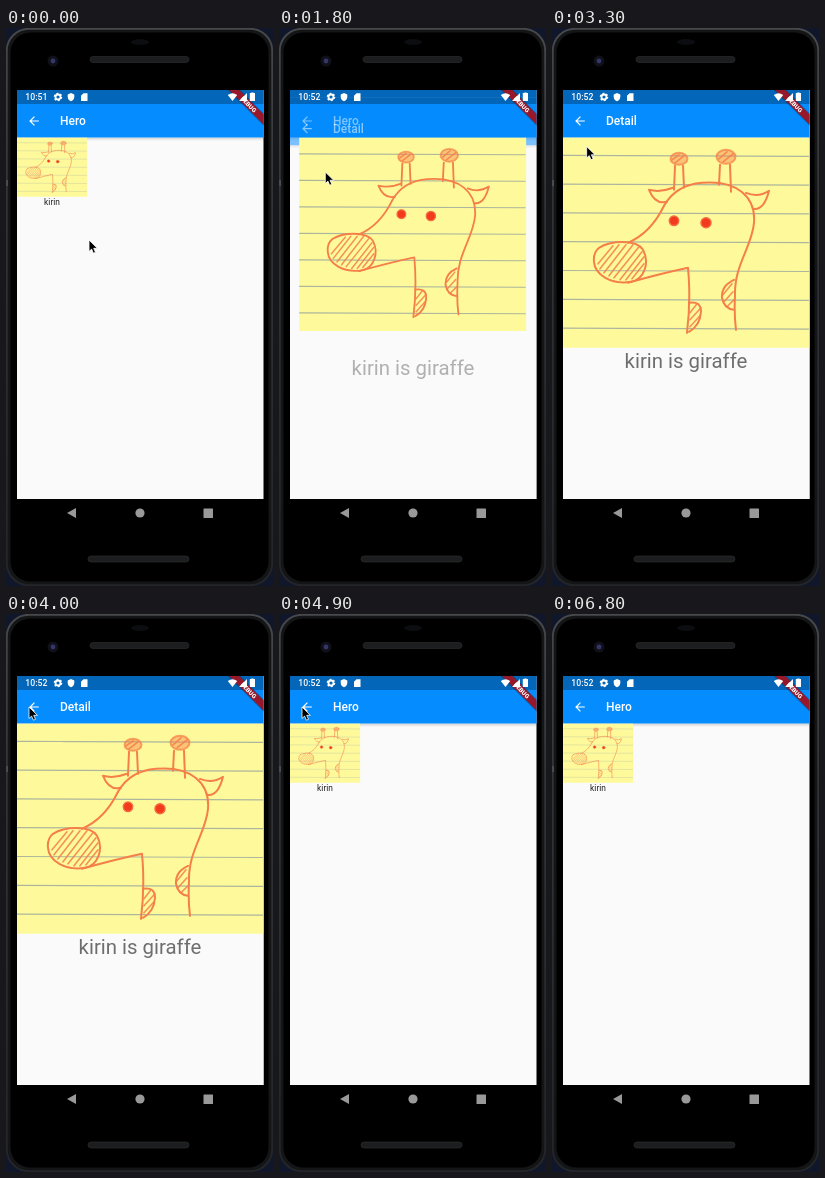
Animation, 267 px wide and 558 px high, one loop 6.9 s. Source, as an HTML page:

```html
<!DOCTYPE html>
<html lang="en">
<head>
<meta charset="utf-8">
<title>Hero transition</title>
<style>
  html, body { margin: 0; width: 100%; height: 100%; overflow: hidden; background: #10172a; }
  svg { display: block; width: 267px; height: 558px; font-family: Roboto, sans-serif; }
  .title { font-size: 12px; font-weight: 500; fill: #fff; }
  .ink { fill: none; stroke: #f57f48; stroke-width: 2; stroke-linecap: round; stroke-linejoin: round; }
  .hatch { stroke-width: 1.6; stroke-opacity: .85; }
</style>
</head>
<body>
<svg viewBox="0 0 267 558">
  <defs>
    <clipPath id="screen"><path d="M11 62H257.5V471H11z"/></clipPath>
    <linearGradient id="shade" x2="0" y2="1">
      <stop stop-opacity=".16"/><stop offset="1" stop-opacity="0"/>
    </linearGradient>
    <linearGradient id="rim" x2="0" y2="1">
      <stop stop-color="#48494b"/><stop offset=".3" stop-color="#333436"/><stop offset="1" stop-color="#242528"/>
    </linearGradient>
    <g id="page">
      <path d="M11 62H258V471H11z" fill="#fafafa"/>
      <path d="M11 109.5H258v3.5H11z" fill="url(#shade)"/>
      <path d="M11 62H258V109.5H11z" fill="#058dff"/>
      <path transform="translate(20.8 85.8) scale(.6)" fill="#fff"
        d="M20 11H7.83l5.59-5.59L12 4l-8 8 8 8 1.41-1.41L7.83 13H20z"/>
    </g>
  </defs>

  <!-- phone body -->
  <rect x=".8" y=".8" width="265.4" height="556.4" rx="22" fill="#141517" stroke="url(#rim)" stroke-width="1.8"/>
  <rect x="4.5" y="4.5" width="258" height="549" rx="20"/>
  <path d="M0 152h2v6H0z" fill="#4a4b4e"/>
  <ellipse cx="134" cy="14" rx="9" ry="3" fill="#0c0d10"/>
  <circle cx="47" cy="33" r="5.5" fill="#101118"/>
  <circle cx="47" cy="33" r="2.4" fill="#34366a"/>
  <g fill="#1c1d1f" stroke="#2a2b2d" stroke-width=".7">
    <rect x="84" y="28.5" width="99" height="6" rx="3"/>
    <rect x="82" y="528" width="101" height="6" rx="3"/>
  </g>
  <g fill="#999">
    <path d="M61 485l9-5v10z"/><circle cx="134" cy="485" r="4.6"/>
    <rect x="197.5" y="480.5" width="9.5" height="9.5" rx=".6"/>
  </g>

  <g clip-path="url(#screen)">
    <use href="#page"/>
    <text class="title" x="54" y="97.2">Hero</text>
    <text x="46" y="177" font-size="8.4" text-anchor="middle" fill="#222">kirin</text>

    <g id="detail">
      <use href="#page"/>
      <text class="title" x="54" y="97.2">Detail</text>
      <text x="134" y="339.5" font-size="20.4" text-anchor="middle" fill="#000" fill-opacity=".56">kirin is giraffe</text>
    </g>

    <!-- giraffe on lined paper, 246 x 210 -->
    <g id="picture">
      <path d="M0 0H246.5V210H0z" fill="#fefa9c"/>
      <path id="rules" fill="none" stroke="#adb69c" stroke-width="1.2"/>
      <g class="ink" transform="translate(-11 -110)">
        <path d="M112 178Q124 157 150 155C185 152 204 169 202 195C200 219 182 237 183 268Q182 287 184 302"/>
        <path d="M112 178Q99 205 76 215M76 255Q108 246 136 240Q139 272 135 305"/>
        <path d="M121 160Q108 165 97 162Q103 177 115 174M194 165Q206 170 217 163Q212 183 201 181"/>
        <path d="M123 138L122 162M131 138L132 160M168 137L167 157M178 137L179 164"/>
        <path d="M47 220C58 213 84 211 91 222C98 235 92 252 79 254C59 257 43 247 42 234Q41 225 47 220"/>
        <path d="M137 275Q149 273 149 284Q148 298 137 304M182 252Q169 258 170 270Q172 281 182 282"/>
        <path class="hatch" d="M46 236L61 218M48 241L67 217M52 245L74 217M57 248L81 217M62 250L87 219M68 252L90 224M74 252L92 229M80 251L92 236
          M138 285L145 276M138 292L149 280M138 299L148 288M171 267L180 256M172 274L181 264M175 279L182 272"/>
        <g fill="#f57f48" fill-opacity=".45" stroke-opacity=".7">
          <ellipse cx="127" cy="131" rx="8.5" ry="6"/><ellipse cx="174" cy="129" rx="9.5" ry="7"/>
        </g>
        <path class="hatch" d="M120 132l7-5M123 135l9-7M167 131l8-7M171 134l10-8"/>
        <g fill="#f23a1c" stroke="#f66a42" stroke-width="1.5">
          <circle cx="122" cy="193" r="4.7"/><circle cx="154" cy="195" r="5"/>
        </g>
      </g>
    </g>

    <path d="M11 62H258V76H11z" fill-opacity=".28"/>
    <g transform="translate(257 62) rotate(45)">
      <path d="M-40 16H40V25H-40z" fill-opacity=".25"/>
      <path d="M-40 16.8H40V24H-40z" fill="#96182a"/>
      <text y="22.6" font-size="6.1" font-weight="900" text-anchor="middle" fill="#fff">DEBUG</text>
    </g>

    <!-- status bar -->
    <g fill="#fff">
      <text id="clock" x="19.3" y="72.2" font-size="8.7" font-weight="500"></text>
      <circle cx="52" cy="69" r="2.5" fill="none" stroke="#fff" stroke-width="1.8"/>
      <circle cx="52" cy="69" r="3.7" fill="none" stroke="#fff" stroke-width="1.2" stroke-dasharray="1.9 1.97"/>
      <path d="M65 65l3.3 1.4v2.4q0 3.2-3.3 4.4q-3.3-1.2-3.3-4.4v-2.4z"/>
      <path d="M77.5 65.2H81.5V73H75V67.7z"/>
      <path d="M221.8 67Q226.5 63.6 231.2 67L226.5 73z"/>
      <path d="M241 65V73H233z"/>
      <path d="M245.3 65.1V64.5h2.2v.6H249V73h-5.2v-7.9z"/>
    </g>
  </g>

  <path id="cursor" d="M0 0V11.5L2.6 9.1L4.4 13.2L6.5 12.3L4.7 8.3H8.4z" stroke="#fff" stroke-width=".8"/>
</svg>

<script>
const LOOP = 6900, STEP = 100, SLIDE = 300, PUSH = 1598, POP = 4356;
const $ = id => document.getElementById(id);
const clamp = x => Math.min(1, Math.max(0, x));
const mix = (a, b, k) => a + (b - a) * k;

// CSS-style cubic Bezier easing, solved by bisection
function bezier(x1, y1, x2, y2) {
  const at = (a, b, u) => 3 * a * u * (1 - u) ** 2 + 3 * b * u * u * (1 - u) + u ** 3;
  return x => {
    if (x <= 0 || x >= 1) return clamp(x);
    let lo = 0, hi = 1;
    for (let i = 0; i < 24; i++) {
      const mid = (lo + hi) / 2;
      if (at(x1, x2, mid) < x) lo = mid; else hi = mid;
    }
    return at(y1, y2, lo);
  };
}
const fastOutSlowIn = bezier(.4, 0, .2, 1);
const easeIn = bezier(.42, 0, 1, 1);
const easeInOut = bezier(.42, 0, .58, 1);

// time, x, y of the pointer tip
const path = [[0, 83, 212], [700, 83, 212], [1300, 46.3, 144], [3000, 46.3, 144],
              [3600, 23, 93], [5000, 23, 93], [5500, -12, 62], [LOOP, -12, 62]];

function pointer(t) {
  const i = path.findIndex(p => p[0] > t);
  const [t0, x0, y0] = path[i - 1], [t1, x1, y1] = path[i];
  const k = easeInOut((t - t0) / (t1 - t0));
  return [mix(x0, x1, k), mix(y0, y1, k)];
}

function draw(t) {
  const popping = t >= POP;
  const p = popping ? 1 - clamp((t - POP) / SLIDE) : clamp((t - PUSH) / SLIDE);
  const slide = fastOutSlowIn(p);
  $('detail').setAttribute('opacity', easeIn(p));
  $('detail').setAttribute('transform', `translate(0 ${102 * (1 - slide)})`);

  // the picture's centre follows an arc, a different one each way
  const size = slide ** 1.5, arc = Math.sqrt(1 - (1 - size) ** 2);
  const w = mix(70, 246, size), h = mix(59, 210, size);
  const x = mix(46, 134, popping ? size : arc) - w / 2;
  const y = mix(139.3, 214.8, popping ? arc : size) - h / 2;
  $('picture').setAttribute('transform', `translate(${x} ${y}) scale(${w / 246} ${h / 210})`);

  $('cursor').setAttribute('transform', `translate(${pointer(t)})`);
  $('clock').textContent = t < 900 ? '10:51' : '10:52';
}

$('rules').setAttribute('d', Array.from({ length: 7 }, (_, i) => `M0 ${17.5 + 28.8 * i}l246 1`).join(''));

const start = performance.now();
function tick() {
  const t = (performance.now() - start) % LOOP;
  draw(Math.floor(t / STEP) * STEP);
  requestAnimationFrame(tick);
}
tick();
</script>
</body>
</html>
```
